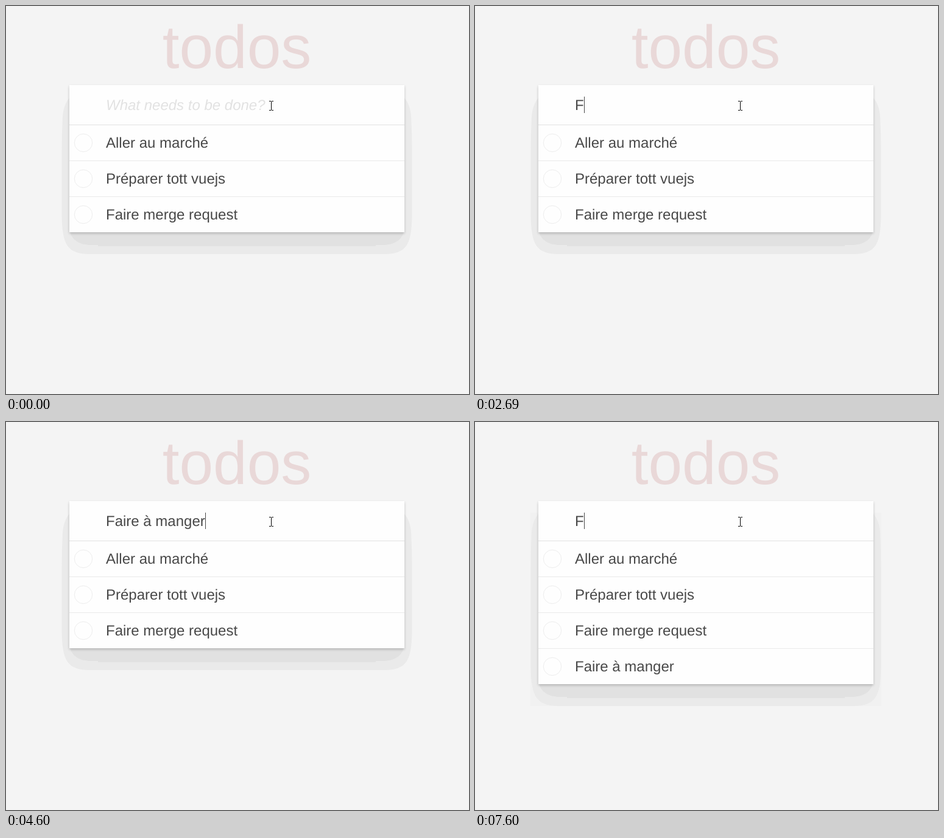
Recreate the animation shown at these times as an HTML page. Size 760 by 638 pixels, loop 8000 ms.

```html
<!DOCTYPE html>
<html lang="fr">
<head>
<meta charset="utf-8">
<title>todos</title>
<style>
  html, body { margin: 0; width: 100%; height: 100%; overflow: hidden; background: #f4f4f4; }
  svg { display: block; width: 760px; height: 638px; }
  text {
    font: 24px "Liberation Sans", Arial, sans-serif;
    font-kerning: none;
    text-rendering: geometricPrecision;
    fill: #484848;
    white-space: pre;
  }
  #title { font-size: 100px; fill: #e9d8d8; text-anchor: middle; }
  #hint { font-style: italic; fill: #e2e2e2; }
</style>
</head>
<body>
<svg viewBox="0 0 760 638">
  <defs>
    <filter id="blur" x="-5%" y="-10%" width="110%" height="120%">
      <feGaussianBlur stdDeviation="2"/>
    </filter>
  </defs>
  <rect width="760" height="638" fill="#f4f4f4"/>
  <text id="title" x="379" y="102">todos</text>

  <rect id="halo" x="91" y="149" width="576" height="318" fill="#f1f1f1"/>
  <path id="outer" fill="#eaeaea"/>
  <path id="inner" fill="#e1e1e1"/>
  <rect id="near" x="104" y="132" width="550" opacity=".2" filter="url(#blur)"/>
  <rect id="card" x="104" y="130" width="550" fill="#fefefe"/>
  <rect x="104" y="195" width="550" height="1" fill="#e1e1e1"/>

  <g id="list"></g>

  <text id="hint" x="164" y="171">What needs to be done?</text>
  <text id="entry" x="164" y="171"></text>
  <rect id="caret" y="149" width="1" height="27" fill="#484848"/>
  <path d="M432 156h3v1h1v-1h3v1h-3v14h3v1h-3v-1h-1v1h-3v-1h3v-14h-3z" fill="#000" shape-rendering="crispEdges"/>
</svg>
<script>
const LOOP = 8000, ADDED = 4910, ROW = 59, LIST_TOP = 196, LEFT = 164;
const PHRASE = "Faire à manger";
const TASKS = ["Aller au marché", "Préparer tott vuejs", "Faire merge request", PHRASE];

// Caret toggles while the field is empty; starts hidden.
const BLINKS = [150, 580, 1120, 1670, 2230];
const BLINKS_AFTER = [4910, 5470, 6030, 6460, 7020];
// [time, number of letters typed]
const KEYS = [[2690, 1], [2850, 2], [3110, 4], [3230, 5], [3390, 6], [3660, 7], [3790, 8],
  [3940, 9], [4090, 10], [4220, 11], [4340, 12], [4480, 13], [4600, 14], [ADDED, 0], [7600, 1]];

const $ = id => document.getElementById(id);
const set = (el, attrs) => {
  for (const k in attrs) el.setAttribute(k, attrs[k]);
};
const show = (el, on) => set(el, { visibility: on ? "visible" : "hidden" });

function make(tag, parent, attrs) {
  const el = document.createElementNS("http://www.w3.org/2000/svg", tag);
  set(el, attrs);
  return parent.appendChild(el);
}

const rows = TASKS.map((task, i) => {
  const g = make("g", $("list"), {}), top = LIST_TOP + i * ROW;
  if (i) make("rect", g, { x: 104, y: top - 1, width: 550, height: 1, fill: "#eaeaea" });
  make("circle", g, { cx: 127, cy: top + 29, r: 14.7, fill: "none", stroke: "#ededed", "stroke-width": 1 });
  make("text", g, { x: LEFT, y: top + 37 }).textContent = task;
  return g;
});

function layout(count) {
  const b = LIST_TOP + count * ROW - 1;
  set($("card"), { height: b - 130 });
  set($("near"), { height: b - 130 });
  set($("outer"), { d: `M104 151C97 160 94 169 93 182Q91.5 210 91.5 240V${b - 27}
    C92.5 ${b + 20} 100 ${b + 36} 138 ${b + 36}H620
    C658 ${b + 36} 665.5 ${b + 20} 666.5 ${b - 27}V240Q666.5 210 665 182C664 169 661 160 654 151Z` });
  set($("inner"), { d: `M105 ${b}C109 ${b + 12} 119 ${b + 21} 140 ${b + 21}H151V${b + 23}H607V${b + 21}H618
    C639 ${b + 21} 649 ${b + 12} 653 ${b}Z` });
  show($("halo"), count > 3);
  rows.forEach((g, i) => show(g, i < count));
}

let lastCount, lastTyped;

function draw(t) {
  const count = t < ADDED ? 3 : 4;
  if (count !== lastCount) layout(lastCount = count);

  const typed = KEYS.reduce((n, [at, len]) => t >= at ? len : n, 0);
  if (typed !== lastTyped) {
    const entry = $("entry");
    entry.textContent = PHRASE.slice(0, typed);
    show($("hint"), !typed);
    set($("caret"), { x: LEFT + (typed ? Math.round(entry.getComputedTextLength()) : 0) });
    lastTyped = typed;
  }
  const toggles = t < ADDED ? BLINKS : BLINKS_AFTER;
  show($("caret"), typed || toggles.filter(at => t >= at).length % 2);
}

const start = performance.now();
function tick() {
  draw((performance.now() - start) % LOOP);
  requestAnimationFrame(tick);
}
tick();
</script>
</body>
</html>
```
